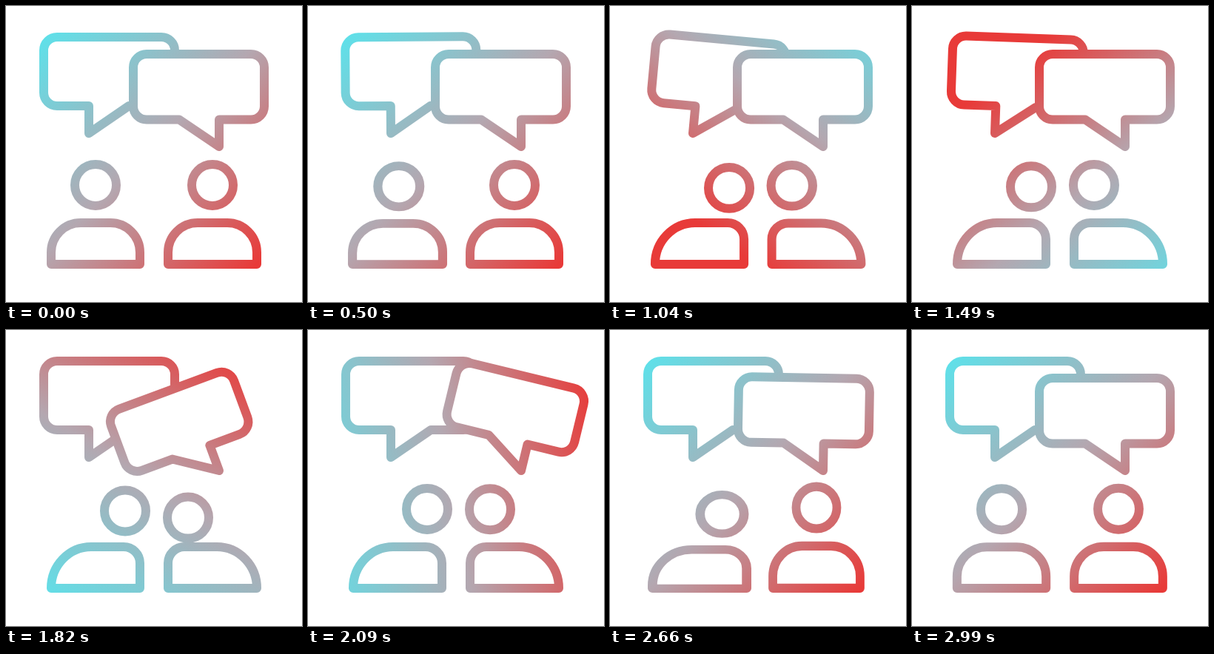
Recreate the animation shown at these times as an HTML page with a canvas. Size 400 by 400 pixels, loop 3020 ms.

```html
<!DOCTYPE html>
<html lang="en">
<head>
<meta charset="utf-8">
<title>Conversation</title>
<style>
html, body { margin: 0; width: 100%; height: 100%; overflow: hidden; background: #fff; }
canvas { display: block; width: 100%; height: 100%; object-fit: contain; }
</style>
</head>
<body>
<canvas id="stage" width="400" height="400"></canvas>
<script>
const ctx = document.getElementById('stage').getContext('2d');
const LOOP = 3020, HOLD = 500, STEP = 30;

const clamp = u => Math.min(1, Math.max(0, u));
const smooth = u => (1 - Math.cos(Math.PI * u)) / 2;
const mix = (a, b, u) => a + (b - a) * u;

// Bubble angle in degrees: eased swings to alternating sides, each one smaller.
function swing(t) {
  const k = Math.max(0, t / 230), n = Math.floor(k);
  const peak = i => i ? Math.max(0, 26.2 - 5.8 * i) * (-1) ** i : 0;
  return mix(peak(n), peak(n + 1), smooth(k - n));
}

// Widening of a person after a push: a damped wave.
const wobble = t => t > 0 ? 0.1 * Math.sin(Math.PI * t / 190) * Math.exp(-t / 173) : 0;

const slide = t => clamp(t / 230);

// Two nods of the given length.
const nod = (t, time) => Math.sin(Math.PI * 2 * clamp(t / time / 2)) ** 2;

const people = [
  { x: 121, side: 1, reach: 40, lean: 490, back: 2595, nodAt: 950, nodTime: 470 },
  { x: 279, side: -1, reach: 33, lean: 580, back: 2362, nodAt: 1560, nodTime: 550 }
];

// The tail tip is the origin; the long part of the box lies to the right.
function bubblePath(height, tail) {
  const l = -61, r = 116, b = -tail, top = b - height, c = 18;
  ctx.beginPath();
  ctx.moveTo(0, 0);
  ctx.lineTo(0, b);
  ctx.arcTo(l, b, l, top, c);
  ctx.arcTo(l, top, r, top, c);
  ctx.arcTo(r, top, r, b, c);
  ctx.arcTo(r, b, 0, b, c);
  ctx.lineTo(54, b);
  ctx.closePath();
}

function drawBubble(x, y, side, angle, height, tail) {
  ctx.save();
  ctx.translate(x, y);
  ctx.rotate(angle * Math.PI / 180);
  ctx.scale(side, 1);
  bubblePath(height, tail);
  ctx.globalCompositeOperation = 'destination-out';
  ctx.fill();
  ctx.globalCompositeOperation = 'source-over';
  ctx.stroke();
  ctx.restore();
}

function drawPerson(p, t) {
  const turn = slide(t - p.lean) - slide(t - p.back);
  const wide = wobble(t - p.lean) + wobble(t - p.back);
  const dip = 11.7 * nod(t - p.nodAt, p.nodTime);
  const rx = mix(40, 54, turn), ry = mix(40, 56, turn), inner = mix(40, 22, turn);

  ctx.save();
  ctx.translate(p.x, 355);
  ctx.scale(p.side * (1 + wide), 1 - wide);

  ctx.beginPath();
  ctx.moveTo(-60, -6);
  ctx.ellipse(-60 + rx, -62 + ry, rx, ry, 0, Math.PI, Math.PI * 1.5);
  ctx.arc(60 - inner, -62 + inner, inner, -Math.PI / 2, 0);
  ctx.lineTo(60, -6);
  ctx.closePath();
  ctx.stroke();

  ctx.beginPath();
  ctx.arc(p.reach * turn, -113 + dip, 28, 0, Math.PI * 2);
  ctx.stroke();
  ctx.restore();
}

// Colours the strokes with a gradient that makes one turn and drifts off centre on the way.
function tint(t) {
  const turn = smooth(clamp((t - HOLD) / 2300) ** 0.8);
  const drift = Math.max(0, Math.sin(Math.PI * turn / 0.7));
  const a = Math.PI * (0.25 + 2 * turn);
  const len = 421 - 50 * drift, mid = 0.515 + 0.19 * drift;
  const at = k => [200 + Math.cos(a) * len * (k - mid), 200 + Math.sin(a) * len * (k - mid)];
  const g = ctx.createLinearGradient(...at(0), ...at(1));
  g.addColorStop(0, '#5fe0e9');
  g.addColorStop(0.5, '#b4a7b0');
  g.addColorStop(1, '#e83a38');
  ctx.globalCompositeOperation = 'source-in';
  ctx.fillStyle = g;
  ctx.fillRect(0, 0, 400, 400);
  ctx.globalCompositeOperation = 'source-over';
}

function draw(t) {
  ctx.clearRect(0, 0, 400, 400);
  ctx.lineWidth = 12;
  ctx.lineJoin = 'round';
  ctx.fillStyle = ctx.strokeStyle = '#000';
  drawBubble(112, 172, 1, swing(t - 480), 93, 37);
  drawBubble(288, 190, -1, swing(t - 1600), 88.5, 36.5);
  people.forEach(p => drawPerson(p, t));
  tint(t);
}

function frame() {
  const t = performance.now() % LOOP;
  draw(t < HOLD ? 0 : HOLD + Math.floor((t - HOLD) / STEP) * STEP);
  requestAnimationFrame(frame);
}
frame();
</script>
</body>
</html>
```
